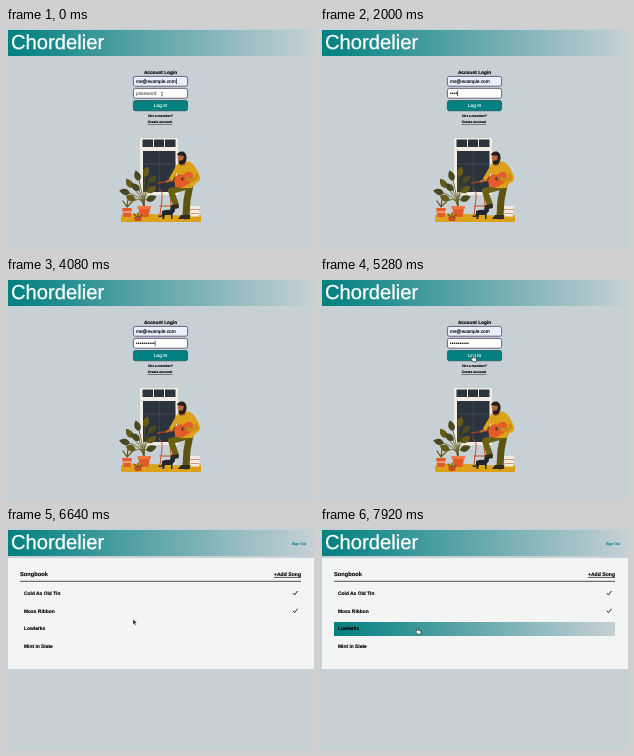
Recreate the animation shown at these times as an HTML page. Size 308 px wide and 222 px high, loop 8 s.

```html
<!DOCTYPE html>
<html lang="en">
<head>
<meta charset="utf-8">
<title>Songbook login</title>
<style>
  html, body { margin: 0; width: 100%; height: 100%; overflow: hidden; background: #c6d0d5; }
  svg { display: block; width: 100vw; height: 100vh; }
  text { font: 4.75px "Liberation Sans", Arial, sans-serif; text-rendering: geometricPrecision; fill: #000; stroke: #000; stroke-width: .13; }
  .bold { font-weight: 700; }
  .mid { text-anchor: middle; }
  .end { text-anchor: end; }
  .link { text-decoration: underline; }
  .white { fill: #fff; stroke: #fff; }
  #brand { font-size: 20.2px; stroke-width: .3; }
  #hint { fill: #666; stroke: #666; }
  .tiny { font-size: 3.4px; }
  .song { font-size: 4.9px; font-weight: 700; }
  .field { stroke: #4c4763; stroke-width: .8; }
  .tick { fill: none; stroke: #111; stroke-width: .9; }
  .line { fill: none; stroke-linecap: round; stroke-linejoin: round; }
</style>
</head>
<body>
<svg viewBox="0 0 308 222" preserveAspectRatio="none">
  <defs>
    <linearGradient id="fade">
      <stop stop-color="#008080"/>
      <stop offset="1" stop-color="#c6d0d5"/>
    </linearGradient>
    <path id="leaf" d="M0 1C-5-2-5-7 0-12C5-7 5-2 0 1Z"/>
  </defs>
  <rect width="308" height="222" fill="#c6d0d5"/>
  <rect x="2" y="2" width="306" height="26" fill="url(#fade)"/>
  <text id="brand" class="white" x="5" y="21">Chordelier</text>

  <g id="login">
    <text class="bold mid" x="154.5" y="45.5">Account Login</text>
    <rect class="field" x="127.4" y="48.4" width="54.2" height="9.8" rx="2" fill="#e8f0fe"/>
    <text id="email" x="130" y="55">me@example.com</text>
    <rect class="field" x="127.4" y="60.4" width="54.2" height="9.8" rx="2" fill="#fff"/>
    <text id="hint" x="130" y="66.8">password</text>
    <g id="dots"></g>
    <rect id="caret" width=".6" height="5.4"/>
    <rect x="127.4" y="72.6" width="54.2" height="10.2" rx="2" fill="#008080" stroke="#235b60" stroke-width=".8"/>
    <text class="mid white" x="154.5" y="79.4">Log In</text>
    <text class="bold mid tiny" x="154.5" y="89.4">Not a member?</text>
    <text class="bold mid tiny link" x="154" y="95.2">Create account</text>

    <g id="scene">
      <path d="M115 187Q135 185 155 186.500T195 187V194H115Z" fill="#dca21c"/>
      <path d="M134 110H172V167H134Z" fill="#f3ece4"/>
      <path d="M136.500 111.500H147V119H136.500ZM148 111.500H158V119H148ZM159 111.500H169.500V119H159ZM137 123H169.500V164H137Z" fill="#2b343c"/>
      <path d="M153.300 123V164M137 136H170" stroke="#46525a" stroke-width=".7"/>
      <path class="line" d="M153 161Q157 163 156 171L154 187M164 167L166 187M154 178H165" stroke="#c84d27" stroke-width="1"/>
      <g id="plant"></g>

      <path class="line" d="M184 157L181 172L180 188" stroke="#5c5310" stroke-width="7"/>
      <path class="line" d="M183 158L165 163L170 177" stroke="#6b6115" stroke-width="6"/>
      <path d="M175 187H184V191H172ZM165 177L172 176L173 180L164 182Z" fill="#302a20"/>
      <path d="M171 136Q178 132 184 134Q190 137 194 149Q195 153 190 155L186 160H175L171 149Z" fill="#dca21c"/>
      <path d="M173 130H179V137L174 138Z" fill="#a05a34"/>
      <path d="M171.500 128Q172 124 176 124Q181 124 180 131L177 136Q173 137 172 132Z" fill="#b7693e"/>
      <path d="M171 127Q172 123 177 123.500Q182 126 180 133Q178 138 173 136L172.500 133L177 132L178 128Z" fill="#25201d"/>
      <path class="line" d="M177 151L152 155" stroke="#a13e21" stroke-width="1.6"/>
      <path d="M169 149Q173 145 177 147Q183 141 187 146Q188 155 180 157Q177 161 171 159Q167 155 169 149Z" fill="#e65c28"/>
      <circle cx="177" cy="151" r="1.800" fill="#572b20"/>
      <path class="line" d="M172 139L165 151" stroke="#dca21c" stroke-width="4.200"/>
      <path class="line" d="M190 147Q192 152 184 152L180 150" stroke="#c98c16" stroke-width="3.200"/>
      <path class="line" d="M164 152L161 153.500M180 150L178 151" stroke="#b7693e" stroke-width="2.200"/>

      <path d="M132 178H144.500L142.500 189H134Z" fill="#e45b2b"/>
      <path d="M131.500 178H145V181H131.500Z" fill="#f07742"/>
      <path d="M116 180H126L124.500 189H117.500Z" fill="#e45b2b"/>
      <path d="M117 184H125" stroke="#f3d5b8"/>
      <path class="line" d="M121 179L117 173M121 179L122 171M121 179L126 174M132 190L128 186M132 190V185M132 190L136 187" stroke="#655a18" stroke-width="1.300"/>
      <path d="M128 189H136L135 193H129Z" fill="#c84d27"/>
      <path d="M184 178H194L193 188.500H185Z" fill="#f3ece4"/>
      <path d="M184 181.500H194M185 185.500H193" stroke="#d17b58" stroke-width=".8"/>
      <path d="M156 183Q161 181 165 182L165 179L166.500 180.500L168.500 179L169 183L166.500 186V191H165V187H159L158 191H156.500Z" fill="#20262d"/>
      <path class="line" d="M157 184Q156 190 153 188" stroke="#20262d" stroke-width="1.200"/>
    </g>
  </g>

  <g id="book">
    <text class="end" x="300" y="16.5" style="font-size:3.7px;fill:#008080;stroke:#008080">Sign Out</text>
    <rect x="2" y="30" width="306" height="111" fill="#f3f4f4"/>
    <text class="bold" x="14" y="48" style="font-size:5.7px">Songbook</text>
    <text class="bold end link" x="295" y="48" style="font-size:5.1px">+Add Song</text>
    <path d="M14 53.3H295" stroke="#222" stroke-width=".8"/>
    <rect id="hover" x="14" width="281" height="14" fill="url(#fade)"/>
    <g id="songs"></g>
  </g>

  <g id="cursor">
    <path id="beam" d="M-.9-1.800H.9M0-1.800V1.800M-.9 1.800H.9" stroke="#222" stroke-width=".5"/>
    <path id="arrow" d="M0 0V5.600L1.400 4.500L2.300 6.400L3.200 6L2.300 4.100H4Z" fill="#111" stroke="#fff" stroke-width=".5"/>
    <path id="hand" d="M0 0Q.8-.6 1.300 0V2.200L4 3Q4.600 4.500 3.500 6.300H.6L-1.400 3.800Q-1 2.500 0 3Z" fill="#fff" stroke="#111" stroke-width=".6"/>
  </g>
</svg>
<script>
const LOOP = 8000, STEP = 80;
const $ = id => document.getElementById(id);
const show = (id, on) => $(id).setAttribute('visibility', on ? 'inherit' : 'hidden');
const setAttrs = (node, attrs) => Object.entries(attrs).forEach(([k, v]) => node.setAttribute(k, v));
const add = (parent, tag, attrs, label = '') => {
  const node = document.createElementNS('http://www.w3.org/2000/svg', tag);
  setAttrs(node, attrs);
  node.textContent = label;
  return $(parent).appendChild(node);
};

const keyTimes = [1400, 1560, 1720, 1920, 2640, 2960, 3280, 3520, 3760, 4000];
const dots = keyTimes.map((_, i) => add('dots', 'circle', { cx: 130.8 + i * 1.9, cy: 65.3, r: .75 }));

['Cold As Old Tin', 'Moss Ribbon', 'Lowlarks', 'Mint in Slate'].forEach((name, i) => {
  const y = 67 + i * 17.7;
  add('songs', 'text', { class: 'song', x: 18, y }, name);
  if (i < 2) add('songs', 'path', { class: 'tick', d: `M287 ${y - 1.8}l1.5 1.8l3-4` });
});

// Leaf base x, y and angle
[[123, 165, -75], [126, 159, -35], [133, 152, -20], [139, 148, 15], [143, 154, 50], [129, 172, -65], [133, 162, -50], [142, 164, 55], [141, 172, 70]].forEach(([x, y, angle], i) => {
  add('plant', 'path', { class: 'line', d: `M138 179Q137 169 ${x} ${y}`, stroke: '#655a18', 'stroke-width': .8 });
  add('plant', 'use', { href: '#leaf', transform: `translate(${x} ${y}) rotate(${angle}) scale(.85)`, fill: i % 2 ? '#655a18' : '#4a4820' });
});

// Time, x, y
const path = [[0, 156, 66], [4400, 156, 66], [5120, 152.5, 77.5], [6000, 152.5, 77.5], [6640, 127, 91], [7360, 97, 100], [8000, 97, 100]];
function pointer(t) {
  const i = path.findIndex(p => p[0] > t);
  const [t0, x0, y0] = path[i - 1], [t1, x1, y1] = path[i];
  const u = (t - t0) / (t1 - t0), e = u * u * (3 - 2 * u);
  return [x0 + (x1 - x0) * e, y0 + (y1 - y0) * e];
}

const emailEnd = 130.4 + $('email').getComputedTextLength();

function draw(t) {
  const loggedIn = t >= 5440, inPassword = t >= 800;
  show('login', !loggedIn);
  show('book', loggedIn);

  const pressed = keyTimes.filter(k => k <= t), typed = pressed.length;
  dots.forEach((dot, i) => dot.setAttribute('visibility', i < typed ? 'inherit' : 'hidden'));
  show('hint', !typed);
  const justTyped = t - Math.max(0, ...pressed) < 150;
  show('caret', !loggedIn && t < 5200 && (justTyped || t % 1000 < 500));
  setAttrs($('caret'), { x: inPassword ? 129.8 + typed * 1.9 : emailEnd, y: inPassword ? 62.6 : 50.6 });

  const [x, y] = pointer(t);
  const overSecond = t >= 6000 && y < 90, overThird = t >= 6720;
  show('hover', overSecond || overThird);
  $('hover').setAttribute('y', overThird ? 94 : 76);

  const overField = !loggedIn && y < 71;
  const overLink = !loggedIn && y >= 72 || overSecond || overThird;
  show('cursor', t < 1300 || t >= 4400);
  show('beam', overField);
  show('hand', overLink);
  show('arrow', !overField && !overLink);
  $('cursor').setAttribute('transform', `translate(${x} ${y})`);
}

function tick() {
  draw(Math.floor((performance.now() % LOOP) / STEP) * STEP);
  requestAnimationFrame(tick);
}
tick();
</script>
</body>
</html>
```
